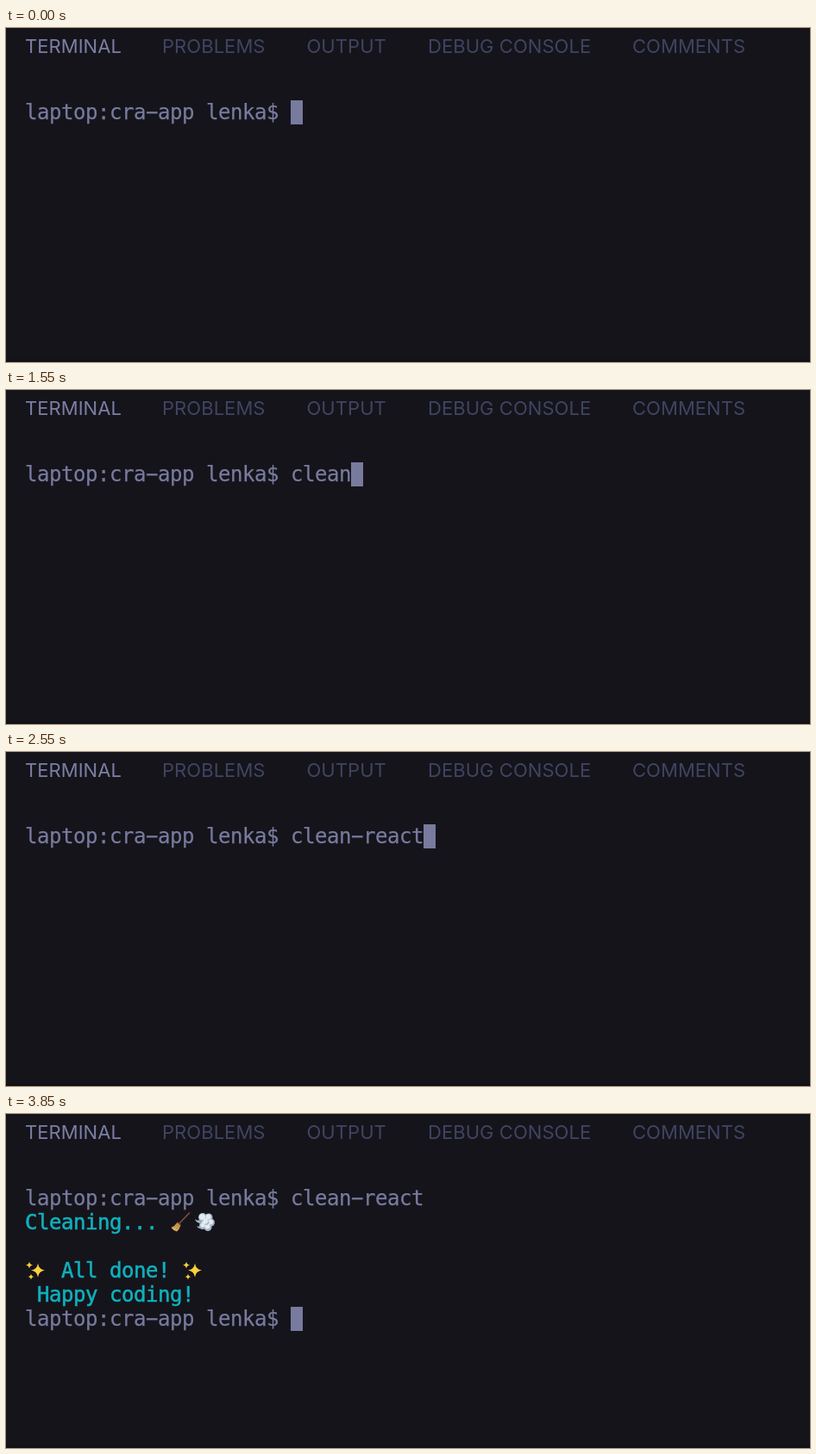
An HTML page that plays this animation: 932 by 388 pixels, repeating every 4110 ms.

```html
<!DOCTYPE html>
<html lang="en">
<head>
<meta charset="utf-8">
<title>Terminal</title>
<style>
  html, body { margin: 0; width: 100%; height: 100%; overflow: hidden; background: #15141b; }
  svg { display: block; width: 932px; height: 388px; }
  .tabs { font: 22px Inter, sans-serif; letter-spacing: 0.05px; fill: #3f4461; }
  .tabs .active { fill: #7b7ea2; }
  #screen { font: 24px "DejaVu Sans Mono", monospace; fill: #787b9e; }
  #screen text { stroke: #787b9e; stroke-width: 0.25px; }
  #screen .info { fill: #10b1bd; stroke: #10b1bd; stroke-width: 0.55px; }
</style>
</head>
<body>
<svg viewBox="0 0 932 388">
  <defs>
    <linearGradient id="straw" x1="0" y1="1" x2="1" y2="0">
      <stop offset="0" stop-color="#edc678"/>
      <stop offset="1" stop-color="#b98235"/>
    </linearGradient>
    <g id="broom">
      <path d="M22.500 3 L11 15" stroke="#80503c" stroke-width="1.6" stroke-linecap="round"/>
      <path d="M8.500 14 L12.500 17.500 Q11 22 8 24.500 Q4 23.500 1.500 20 Q6 18 8.500 14Z" fill="url(#straw)"/>
      <path d="M4 20.500 L9 17 M6.500 22.500 L10.500 18.500" stroke="#a87636" stroke-width="0.7"/>
      <path d="M9 14 L12.500 17" stroke="#8b4a2c" stroke-width="1.2"/>
    </g>
    <g id="puff">
      <g fill="#a3b3c4">
        <circle cx="10" cy="8" r="5"/><circle cx="17" cy="8" r="4.500"/>
        <circle cx="19.500" cy="14" r="4.500"/><circle cx="16" cy="19.500" r="4.500"/>
        <circle cx="10" cy="18" r="4"/><circle cx="12" cy="13" r="6"/>
        <path d="M9 10 Q4 13 1 10 Q2 15 9 15Z M10 16 Q6 20 3 18 Q5 22 11 21Z"/>
      </g>
      <g fill="#e3ebf2">
        <circle cx="9.500" cy="7.500" r="3.500"/><circle cx="16.500" cy="7.500" r="3"/>
        <circle cx="19" cy="13.500" r="3"/><circle cx="15.500" cy="18.500" r="3"/>
        <circle cx="10" cy="17" r="2.600"/><circle cx="12.500" cy="12.500" r="3.500"/>
      </g>
      <path d="M6 12 Q9 14 11 11 M13 16 Q17 17 17 13" fill="none" stroke="#8b9db0"/>
    </g>
    <path id="star" d="M0 -8 Q1 -1 8 0 Q1 1 0 8 Q-1 1 -8 0 Q-1 -1 0 -8Z"/>
    <g id="sparkles" fill="#fdd03c">
      <use href="#star" transform="translate(15 13.500)"/>
      <use href="#star" transform="translate(5 7.500) scale(.5)"/>
      <use href="#star" transform="translate(7 21) scale(.45)"/>
    </g>
  </defs>
  <rect width="932" height="388" fill="#15141b"/>
  <rect y="385" width="932" height="3" fill="#111017"/>
  <g class="tabs">
    <text class="active" x="22" y="29">TERMINAL</text>
    <text x="181" y="29">PROBLEMS</text>
    <text x="348.500" y="29">OUTPUT</text>
    <text x="489" y="29">DEBUG CONSOLE</text>
    <text x="726" y="29">COMMENTS</text>
  </g>
  <g id="screen"></g>
</svg>
<script>
const LOOP = 4110;
const LEFT = 22, TOP = 84, CELL = 14, LINE = 28;
const PROMPT = "laptop:cra-app lenka$";
const COMMAND = "clean-react";
const KEY_TIMES = [900, 1100, 1200, 1450, 1550, 1850, 1950, 2050, 2150, 2350, 2550];
const INPUT_COL = PROMPT.length + 1;

const screen = document.getElementById("screen");
const timed = [];

function add(tag, attributes, start = 0) {
  const node = document.createElementNS("http://www.w3.org/2000/svg", tag);
  for (const [key, value] of Object.entries(attributes)) node.setAttribute(key, value);
  screen.append(node);
  timed.push({ node, start });
  return node;
}

const cellX = col => LEFT + col * CELL;
const rowY = row => TOP + row * LINE;

// The terminal face has a wide hyphen, so the minus glyph stands in for it.
const glyphs = text => text.replaceAll("-", "\u2212");

function print(col, row, text, start = 0, style = "") {
  const x = Array.from(text, (_, i) => cellX(col + i)).join(" ");
  const node = add("text", { x, y: rowY(row) + 22, class: style }, start);
  node.textContent = glyphs(text);
  return node;
}

function emoji(name, col, row, start) {
  add("use", { href: "#" + name, x: cellX(col), y: rowY(row) }, start);
}

print(0, 0, PROMPT);
const input = print(INPUT_COL, 0, COMMAND);
print(0, 1, "Cleaning...", 3250, "info");
emoji("broom", 12, 1, 3250);
emoji("puff", 14, 1, 3250);
emoji("sparkles", 0, 3, 3550);
print(3, 3, "All done!", 3550, "info");
emoji("sparkles", 13, 3, 3550);
print(1, 4, "Happy coding!", 3610, "info");
print(0, 5, PROMPT, 3670);
const cursor = add("rect", { width: CELL, height: LINE });

// Cursor stops after the command is entered: time, column, row.
const CURSOR_STOPS = [
  [3000, 0, 1], [3250, 0, 2], [3550, 0, 4], [3610, 0, 5], [3670, INPUT_COL, 5]
];

function draw(time) {
  const typed = KEY_TIMES.filter(key => time >= key).length;
  input.textContent = glyphs(COMMAND.slice(0, typed));

  for (const { node, start } of timed) {
    node.setAttribute("visibility", time >= start ? "visible" : "hidden");
  }

  const stop = CURSOR_STOPS.findLast(([start]) => time >= start);
  const [, col, row] = stop || [0, INPUT_COL + typed, 0];
  cursor.setAttribute("x", cellX(col));
  cursor.setAttribute("y", rowY(row));
}

const begin = performance.now();
function tick() {
  draw((performance.now() - begin) % LOOP);
  requestAnimationFrame(tick);
}
tick();
</script>
</body>
</html>
```
